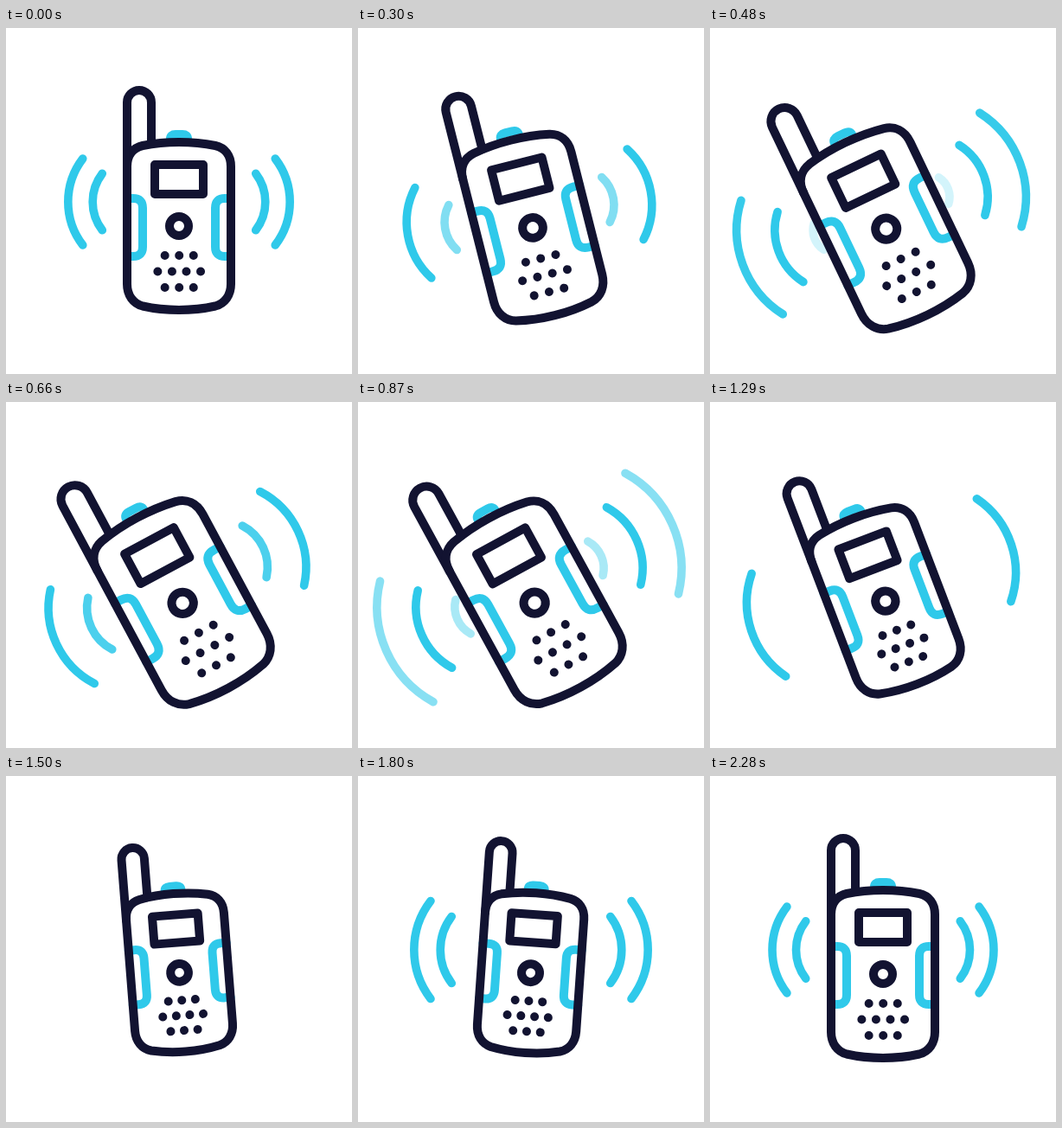
An HTML page with a canvas for the animation above (2.31 s loop, 400 px wide and 400 px high).

```html
<!DOCTYPE html>
<html>
<head>
<meta charset="utf-8">
<style>
  html, body { margin: 0; width: 100%; height: 100%; overflow: hidden; background: #fff; }
  canvas { display: block; width: 400px; height: 400px; }
</style>
</head>
<body>
<canvas width="400" height="400"></canvas>
<script>
const ctx = document.querySelector('canvas').getContext('2d');
const LOOP = 2310, DARK = '#121331', CYAN = '#2fc9ea';
const RAD = Math.PI / 180;

const antenna = new Path2D('M140 160V86A14 14 0 0 1 168 86V134');
const shell = new Path2D('M140 160C140 147 147 138.5 158 136Q178 132 200 132Q222 132 242 136' +
  'C253 138.5 260 147 260 160V296C260 309 253 318.5 242 321.5Q222 326 200 326' +
  'Q178 326 158 321.5C147 318.5 140 309 140 296Z');
const knob = new Path2D('M190 130V128Q190 123 196 123H204Q210 123 210 128V130');
const grips = new Path2D('M140 197H147Q158 197 158 208V253Q158 264 147 264H140' +
  'M260 197H253Q242 197 242 208V253Q242 264 253 264H260');
const face = new Path2D('M172 158H228V192H172ZM211 229A11 11 0 1 1 189 229A11 11 0 1 1 211 229Z');
const speaker = new Path2D();
[[263, 3], [281.5, 4], [300, 3]].forEach(([y, count]) => {
  for (let i = 0; i < count; i++) {
    const x = 200.2 + (i - (count - 1) / 2) * 16.55;
    speaker.moveTo(x, y);
    speaker.lineTo(x + 0.02, y);
  }
});

const clamp = x => Math.min(1, Math.max(0, x));
const linear = x => x;
const smooth = x => 0.5 - 0.5 * Math.cos(Math.PI * x);

// Interpolates [time, value] keys.
function track(t, keys, ease = smooth) {
  let value = keys[0][1];
  for (let i = 1; i < keys.length; i++) {
    const [t0, v0] = keys[i - 1], [t1, v1] = keys[i];
    if (t >= t0) value = v0 + (v1 - v0) * ease(clamp((t - t0) / (t1 - t0)));
  }
  return value;
}

// The shape is transformed while the line keeps its width.
function stroke(path, matrix, color) {
  const placed = new Path2D();
  placed.addPath(path, matrix);
  ctx.strokeStyle = color;
  ctx.stroke(placed);
}

function wavePair(radius, spread, alpha, matrix) {
  if (alpha <= 0 || radius <= 0) return;
  const arcs = new Path2D(), half = 37.5 * RAD;
  for (const [x, facing] of [[spread, 0], [-spread, Math.PI]]) {
    arcs.moveTo(x + radius * Math.cos(facing - half), radius * Math.sin(facing - half));
    arcs.arc(x, 0, radius, facing - half, facing + half);
  }
  ctx.globalAlpha = clamp(alpha);
  stroke(arcs, matrix, CYAN);
  ctx.globalAlpha = 1;
}

function drawWaves(t) {
  if (t < 1500) {
    const settle = smooth(clamp(t / 220));
    const angle = track(t, [[0, 0], [680, -25.1], [1110, -21.9], [1500, -14]]);
    const flow = track(t, [[0, 10.5], [300, 43.2], [660, 98.5], [1110, 155.5], [1480, 235]], linear);
    const gap = 43.2 + t / 500;
    const matrix = new DOMMatrix().translate(200 - 2 * settle, 201 + 13.5 * settle).rotate(angle);
    for (let i = -2; i <= 2; i++) {
      const offset = i === 2 ? 71.5 + 26.5 * clamp(t / 300) : gap * i;
      const radius = flow + offset;
      const fadeIn = i > 0 ? 1 : clamp((radius - 18) / 42);
      wavePair(radius, 46 + 9.5 * settle, fadeIn * clamp((140 - radius) / 26), matrix);
    }
  } else {
    const matrix = new DOMMatrix().translate(200, 201);
    for (const [radius, peak] of [[82, 1.15], [54.5, 1.18]]) {
      const k = track(t, [[1530, 0.4], [1830, peak], [2240, 1]]);
      wavePair(radius * k, 46 - 28 * Math.max(0, k - 1), (t - 1530) / 120, matrix);
    }
  }
}

function drawRadio(t) {
  const angle = track(t, [[0, 0], [600, -28.2], [1080, -29], [1720, 4.2], [2280, 0]]);
  const scale = track(t, [[0, 1], [600, 1.152], [1080, 1.142], [1560, 0.936], [2230, 1]]);
  const matrix = new DOMMatrix().translate(200, 200).scale(scale)
    .translate(0, 21.4).rotate(angle).translate(-200, -221.4);
  stroke(knob, matrix, CYAN);
  stroke(grips, matrix, CYAN);
  for (const part of [antenna, shell, face, speaker]) stroke(part, matrix, DARK);
}

function draw() {
  const t = performance.now() % LOOP;
  ctx.fillStyle = '#fff';
  ctx.fillRect(0, 0, 400, 400);
  ctx.lineCap = ctx.lineJoin = 'round';
  ctx.lineWidth = 9.6;
  drawWaves(t);
  ctx.lineWidth = 10;
  drawRadio(t);
  requestAnimationFrame(draw);
}
draw();
</script>
</body>
</html>
```
